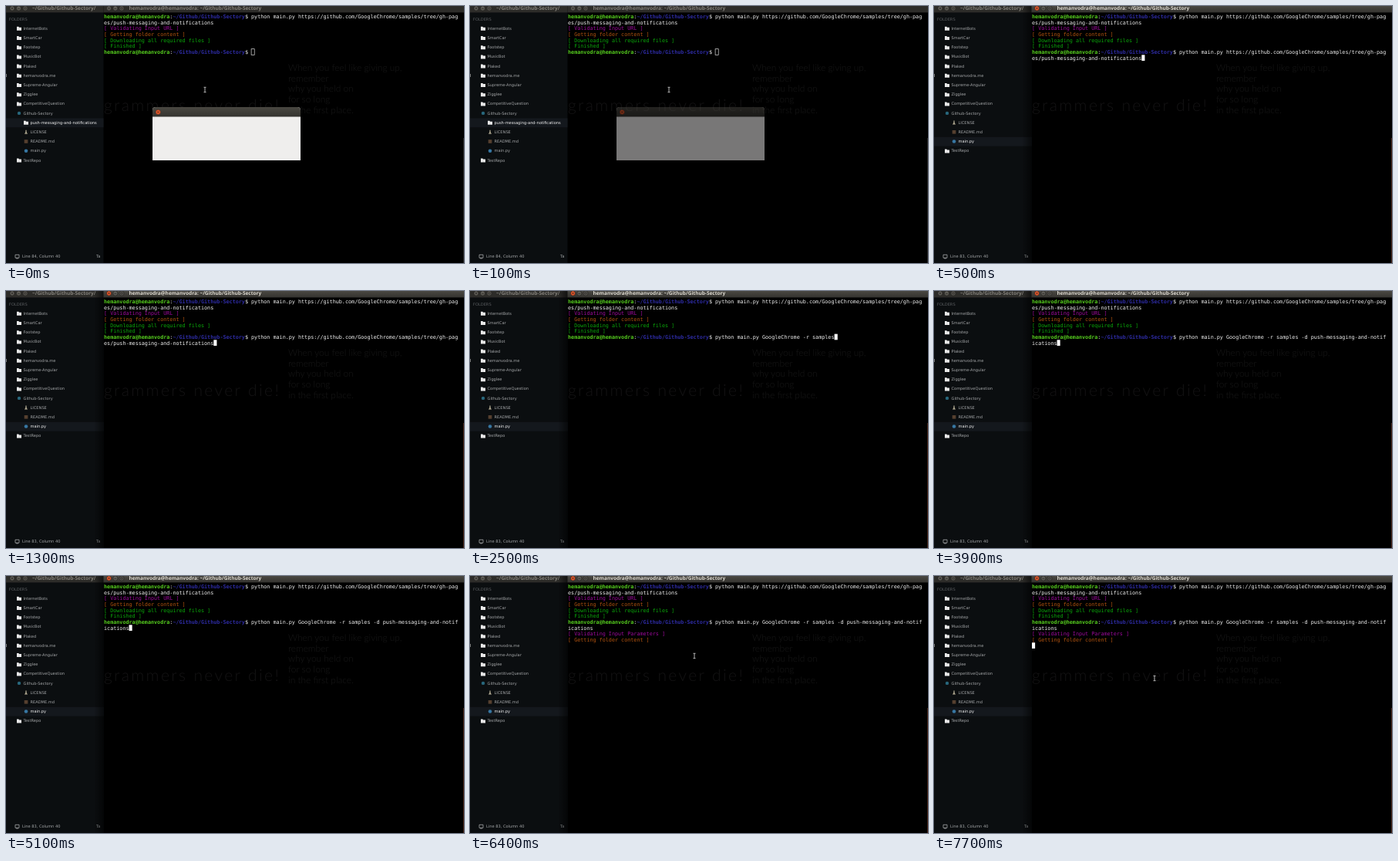
Animation, 594 px wide and 333 px high, one loop 8 s. Source, as an HTML page:

```html
<!DOCTYPE html>
<html lang="en">
<head>
<meta charset="utf-8">
<title>Terminal session</title>
<style>
html, body { margin: 0; width: 100%; height: 100%; overflow: hidden; background: #000; }
svg { display: block; width: 594px; height: 333px; }
text { text-rendering: geometricPrecision; white-space: pre; }
.term { font: 6.754px "DejaVu Sans Mono", monospace; fill: #f2f2f2; }
.side { font: 5.08px "DejaVu Sans", sans-serif; fill: #a4a6a8; }
.title { font: bold 6.5px "Open Sans", sans-serif; fill: #85827c; }
.wall { font: 300 11.9px Lato, sans-serif; fill: #181818; }
.slogan { font-size: 21px; letter-spacing: 2.4px; fill: #141314; }
.user { fill: #55cc1e; font-weight: bold; }
.path { fill: #2d2ba2; font-weight: bold; }
</style>
</head>
<body>
<svg viewBox="0 0 594 333">
  <defs>
    <linearGradient id="bar" x2="0" y2="1">
      <stop stop-color="#4a4842"/><stop offset="1" stop-color="#34332f"/>
    </linearGradient>
    <linearGradient id="fade">
      <stop stop-opacity="0"/><stop offset="1" stop-opacity=".6"/>
    </linearGradient>
  </defs>
  <g id="wallpaper"></g>
  <rect id="scrollbar" x="593" y="171" width="1" height="162"/>
  <g id="terminal"></g>
  <rect id="cursor" width="4.1" height="7.66"/>
  <rect width="126.5" height="333" fill="#0b0e10"/>
  <rect id="highlight" width="126.5" height="11.8" fill="#14181d"/>
  <g id="sidebar"></g>
  <g id="lowerFiles"></g>
  <rect y="88" width="1" height="4" fill="#777"/>
  <path d="M12 322.3h5v4h-5zM13 327h3" fill="none" stroke="#a4a6a8" stroke-width=".8"/>
  <text id="status" class="side" x="21" y="326.4"></text>
  <text class="side" x="117" y="326.4">Ta</text>
  <rect width="126.5" height="8.4" fill="#2d2c29"/>
  <text class="title" x="34" y="5.4">~/Github/Github-Sectory/</text>
  <rect id="shadow" x="114" width="12.5" height="333" fill="url(#fade)"/>
  <rect id="termBar" x="126.5" width="467.5" height="8.4"/>
  <g id="buttons" fill="#5d5b55" stroke="#1f1e1c" stroke-width=".6"></g>
  <text id="termTitle" class="title" x="159.5" y="5.4"></text>
  <g id="dialog">
    <path d="M190 200v-65q0-4 4-4h184q4 0 4 4v65z" fill="#efeeed"/>
    <path d="M190 143.5v-8.5q0-4 4-4h184q4 0 4 4v8.5z" fill="url(#bar)"/>
    <circle cx="197.3" cy="137.5" r="3.3" fill="#e2582c" stroke="#2a2926" stroke-width=".6"/>
    <path d="M196 136.2l2.6 2.6m0-2.6l-2.6 2.6" stroke="#5c2412" stroke-width=".7"/>
  </g>
  <path id="pointer" d="M-1.5-3.2h3M0-3.2v6.4M-1.5 3.2h3" fill="none" stroke="#c8c8c8" stroke-width=".9"/>
</svg>
<script>
const $ = id => document.getElementById(id);
const LOOP = 8000, COLS = 113, CHAR = 4.066, ROW = 7.66, LEFT = 127, TOP = 9.7;
const STEP = 12.2, LIST_TOP = 23;
const USER = 'hemanvodra@hemanvodra', PATH = '~/Github/Github-Sectory';
const PROMPT_LENGTH = USER.length + PATH.length + 3;
const FOLDER = 'push-messaging-and-notifications';
const byUrl = 'python main.py https://github.com/GoogleChrome/samples/tree/gh-pages/' + FOLDER;
const wholeRepo = 'python main.py GoogleChrome -r samples';
const byOptions = `${wholeRepo} -d ${FOLDER}`;
const PURPLE = '#9c0a9c', ORANGE = '#b4540f', GREEN = '#0aa80a';

const history = [[0, ''], [500, byUrl], [800, wholeRepo], [1300, byUrl], [2500, wholeRepo],
  [3100, byUrl], [3500, wholeRepo], [3900, byOptions]];
const cursorOff = [[1900, 2500], [4500, 5100], [5900, 6500], [7100, 7700]];

const valueAt = (steps, t) => steps.filter(([start]) => start <= t).pop()[1];
const show = (id, visible) => $(id).setAttribute('visibility', visible ? 'visible' : 'hidden');
const set = (id, attrs) => {
  for (const name in attrs) $(id).setAttribute(name, attrs[name]);
};

function line(row, content, color = '#f2f2f2') {
  return `<text class="term" x="${LEFT}" y="${TOP + 6.3 + row * ROW}" style="fill:${color}">${content}</text>`;
}

function commandLines(row, command) {
  const room = COLS - PROMPT_LENGTH;
  return line(row, `<tspan class="user">${USER}</tspan>:<tspan class="path">${PATH}</tspan>$ ${command.slice(0, room)}`)
    + line(row + 1, command.slice(room));
}

function sideItem(row, label, icon = 'folder', indent = 0) {
  const y = LIST_TOP + row * STEP + 6.1, x = 17 + indent;
  const icons = {
    folder: `<path d="M${x - 3} ${y - 2.3}h2.4l.8 1h2.8v4h-6z" fill="#e8e8e8"/>`,
    repo: `<circle cx="${x}" cy="${y}" r="2.2" fill="#28677c"/>`,
    license: `<path d="M${x} ${y - 2.6}v2.5m-1.2 2.7l1.2-3 1.2 3" fill="none" stroke="#aaa38c" stroke-width="1.3"/>`,
    readme: `<rect x="${x - 2.3}" y="${y - 2.3}" width="4.6" height="4.6" fill="#56402f"/>`,
    python: `<circle cx="${x}" cy="${y}" r="2.3" fill="#3777a3"/>`
  };
  const id = label === 'main.py' ? ' id="mainFile"' : '';
  return `${icons[icon]}<text${id} class="side" x="${22.5 + indent}" y="${y + 1.7}">${label}</text>`;
}

function buildScene() {
  $('wallpaper').innerHTML =
    '<text class="wall slogan" x="127" y="136">grammers never die!</text>' +
    ['When you feel like giving up,', 'remember', 'why you held on', 'for so long', 'in the first place.']
      .map((words, i) => `<text class="wall" x="366" y="${83.8 + i * 13.8}">${words}</text>`).join('');

  const folders = ['InternetBots', 'SmartCar', 'Footstep', 'MusicBot', 'Plaked', 'hemanvodra.me',
    'Supreme-Angular', 'Zigglee', 'CompetitiveQuestion'];
  $('sidebar').innerHTML = '<text class="side" x="4" y="19" style="fill:#5b5e61">FOLDERS</text>' +
    folders.map((name, i) => sideItem(i, name)).join('') + sideItem(9, 'Github-Sectory', 'repo') +
    `<g id="pushFolder">${sideItem(10, FOLDER, 'folder', 9)}</g>`;
  $('pushFolder').querySelector('text').style.fill = '#f4f4f4';
  $('lowerFiles').innerHTML = sideItem(11, 'LICENSE', 'license', 9) +
    sideItem(12, 'README.md', 'readme', 9) + sideItem(13, 'main.py', 'python', 9) + sideItem(14, 'TestRepo');

  const marks = ['m-1.2-1.2l2.4 2.4m0-2.4l-2.4 2.4', 'm-1.4 .5h2.8', 'm-1.2-1.1h2.4v2.2h-2.4z'];
  $('buttons').innerHTML = [8, 16.5, 25, 133.5, 141.8, 150]
    .map((x, i) => `<circle cx="${x}" cy="3" r="3.1"${i === 3 ? ' id="close"' : ''}/>` +
      `<path d="M${x} 3${marks[i % 3]}" fill="none"/>`).join('');
  $('termTitle').textContent = `${USER}: ${PATH}`;
}

function drawTerminal(t) {
  const command = valueAt(history, t);
  const output = [line(8, '[ Validating Input Parameters ]', PURPLE), line(9, '[ Getting folder content ]', ORANGE)];
  const printed = t < 5500 ? 0 : t < 5600 ? 1 : 2;
  const html = commandLines(0, byUrl) + line(2, '[ Validating Input URL ]', PURPLE) +
    line(3, '[ Getting folder content ]', ORANGE) +
    line(4, '[ Downloading all required files ]', GREEN) + line(5, '[ Finished ]', GREEN) +
    commandLines(6, command) + output.slice(0, printed).join('');
  if (html !== drawTerminal.last) $('terminal').innerHTML = drawTerminal.last = html;

  const cell = PROMPT_LENGTH + command.length;
  const running = t >= 5400, focused = t >= 300;
  const col = running ? 0 : cell % COLS;
  const row = running ? 8 + printed : 6 + Math.floor(cell / COLS);
  set('cursor', {
    x: LEFT + col * CHAR, y: TOP + row * ROW,
    fill: focused ? '#fff' : 'none', stroke: focused ? 'none' : '#ddd', 'stroke-width': .7
  });
  show('cursor', !cursorOff.some(([from, to]) => t >= from && t < to));
}

function drawWindows(t) {
  const focused = t >= 300, deleted = t >= 200;
  set('termBar', { fill: focused ? 'url(#bar)' : '#2d2c29' });
  set('close', { fill: focused ? '#e2582c' : '#5d5b55' });
  set('scrollbar', { fill: focused ? '#4a281c' : '#2c2c2c' });
  $('termTitle').style.fill = focused ? '#dfdbd2' : '#85827c';
  show('shadow', focused);

  show('pushFolder', !deleted);
  set('lowerFiles', { transform: `translate(0 ${deleted ? -STEP : 0})` });
  set('highlight', { y: LIST_TOP + .4 + (deleted ? 12 : 10) * STEP });
  $('mainFile').style.fill = deleted ? '#f4f4f4' : '';
  $('status').textContent = `Line ${deleted ? 83 : 84}, Column 40`;
  set('dialog', { opacity: t < 100 ? 1 : t < 200 ? .5 : 0 });
}

function drawPointer(t) {
  const p = Math.min(1, Math.max(0, (Math.floor(t / 100) * 100 - 6400) / 500));
  const x = t < 500 ? 258 : 291 - 5 * p + 110 * Math.sin(Math.PI * p);
  const y = t < 500 ? 108.5 : 103.5 + 29 * p;
  set('pointer', { transform: `translate(${x} ${y})` });
  show('pointer', t < 500 || t >= 6400);
}

function frame() {
  const t = performance.now() % LOOP;
  drawTerminal(t);
  drawWindows(t);
  drawPointer(t);
  requestAnimationFrame(frame);
}

buildScene();
frame();
</script>
</body>
</html>
```
